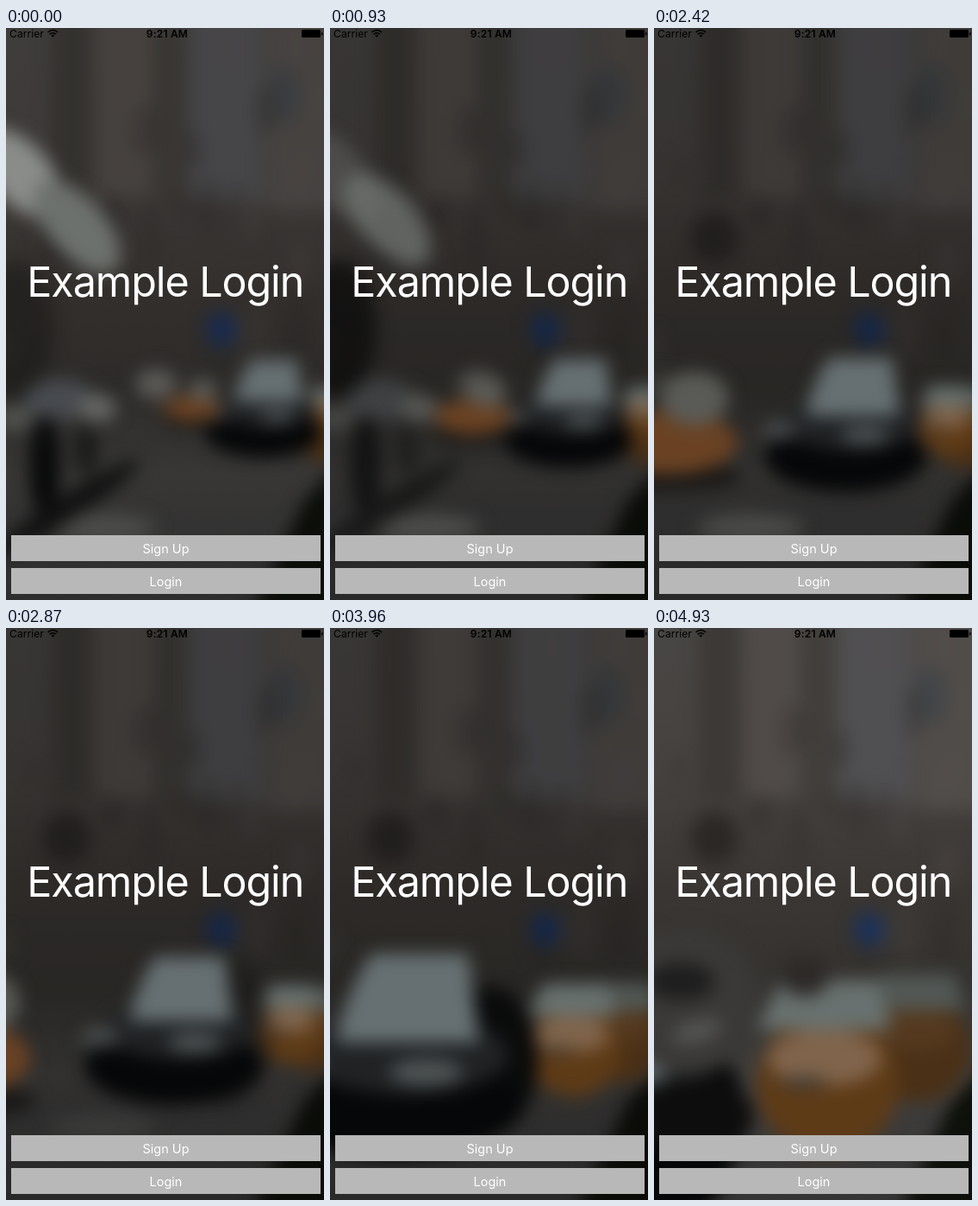
Write an HTML page that moves like this. It is 369 px wide and 662 px high and loops after 5.03 s.

```html
<!DOCTYPE html>
<html lang="en">
<head>
<meta charset="utf-8">
<title>Example Login</title>
<style>
  html, body { margin: 0; width: 100%; height: 100%; overflow: hidden; background: #222; }
  svg { display: block; width: 100vw; height: 100vh; }
  text { font-family: Inter, Roboto, "Liberation Sans", sans-serif; }
</style>
</head>
<body>
<svg viewBox="0 0 369 662" preserveAspectRatio="none">
  <defs>
    <linearGradient id="wallFill" x2="0" y2="1">
      <stop offset="0" stop-color="#484644"/>
      <stop offset=".25" stop-color="#464240"/>
      <stop offset=".46" stop-color="#3a3633"/>
      <stop offset=".63" stop-color="#34322f"/>
      <stop offset=".78" stop-color="#403f3e"/>
      <stop offset="1" stop-color="#363535"/>
    </linearGradient>
    <filter id="soft" filterUnits="userSpaceOnUse" x="-60" y="-60" width="489" height="782" color-interpolation-filters="sRGB">
      <feGaussianBlur stdDeviation="10"/>
    </filter>
  </defs>

  <rect width="369" height="662" fill="url(#wallFill)"/>
  <g id="wall" filter="url(#soft)"></g>
  <rect id="dim" width="369" height="662"/>
  <g id="street" filter="url(#soft)"></g>

  <g id="status">
    <text x="4" y="10.5" font-size="12.2">Carrier</text>
    <g fill="none" stroke="#000" stroke-width="1.5">
      <path d="M48.5 5a8.2 8.2 0 0 1 11.6 0M50.6 7.2a5.2 5.2 0 0 1 7.4 0"/>
      <path d="M54.3 10.8l-1.9-2.1a2.8 2.8 0 0 1 3.8 0z" fill="#000" stroke="none"/>
    </g>
    <text x="187" y="10.5" font-size="12" font-weight="600" letter-spacing=".2" text-anchor="middle">9:21 AM</text>
    <rect x="343" y="2" width="22" height="9" rx="1.5"/>
    <rect x="366" y="5" width="1.5" height="3.5" rx=".7"/>
  </g>

  <text x="184.8" y="311" font-size="48.5" letter-spacing="-1.1" text-anchor="middle" fill="#fff">Example Login</text>

  <g fill="#b8b8b8">
    <rect x="6" y="587" width="359" height="30"/>
    <rect x="6" y="625" width="359" height="30"/>
  </g>
  <g fill="#fff" font-size="14.5" text-anchor="middle">
    <text x="185.5" y="607.5">Sign Up</text>
    <text x="185.5" y="645.5">Login</text>
  </g>
</svg>

<script>
const LOOP = 5030, STEP = 88.7, LEAD = 20;
const $ = id => document.getElementById(id);

function add(parent, tag, attrs) {
  const el = document.createElementNS('http://www.w3.org/2000/svg', tag);
  for (const k in attrs) el.setAttribute(k, attrs[k]);
  return parent.appendChild(el);
}
const blob = (cx, cy, rx, ry, fill, turn = 0) => g =>
  add(g, 'ellipse', { cx, cy, rx, ry, fill, transform: `rotate(${turn} ${cx} ${cy})` });
const box = (x, y, width, height, fill) => g => add(g, 'rect', { x, y, width, height, fill });
const shape = (d, fill) => g => add(g, 'path', { d, fill });

// 0 before a, 1 after b, eased between
function smooth(a, b, t) {
  const u = Math.min(1, Math.max(0, (t - a) / (b - a)));
  return u * u * (3 - 2 * u);
}

function seeded(seed) {
  return () => (seed = seed * 16807 % 2147483647) / 2147483647;
}

// Building front: columns, faint stains, sign and dark kerb
function buildWall() {
  const wall = $('wall'), rnd = seeded(7);
  [
    box(52, -30, 46, 230, '#3c3936'), box(106, -30, 62, 225, '#504b48'),
    box(172, -30, 36, 250, '#413e3b'), box(212, -30, 88, 230, '#504f51'),
    box(304, -30, 90, 240, '#504c49'), blob(322, 78, 18, 34, '#434649')
  ].forEach(draw => draw(wall));
  for (let i = 0; i < 24; i++) {
    const stain = blob(rnd() * 369, rnd() * 400, 6 + rnd() * 12, 14 + rnd() * 26, i % 2 ? '#2a2725' : '#56524f');
    stain(wall).setAttribute('opacity', .3);
  }
  [
    blob(70, 243, 28, 30, '#2b2826'), blob(250, 349, 18, 20, '#1c3159'),
    shape('M400 490L345 548 280 690H400z', '#0e100b')
  ].forEach(draw => draw(wall));
}

// An actor drifts left by a steady part plus a late rush;
// nearing the camera, it grows and sinks in proportion to the drift
const actors = [];
function actor({ x = 0, y = 0, size = 1, pace = 0, rush = 0, grow = 0, sink = 0, fade = () => 1 }, ...parts) {
  const el = add($('street'), 'g', {});
  parts.forEach(draw => draw(el));
  actors.push(t => {
    const drift = pace * t + rush * t ** 4;
    el.setAttribute('transform', `translate(${x - drift} ${y + sink * drift}) scale(${size + grow * drift})`);
    el.setAttribute('opacity', fade(t));
  });
}

const cab = (rx, ry, paint, trim, glass) => [
  blob(0, 4, rx, ry, paint), blob(-2, -12, rx * .8, ry * .4, trim),
  shape(`M${-rx * .65} -60H${rx * .7}L${rx * .9} -29H${-rx}z`, glass)
];

function buildStreet() {
  // Pale patch on the road
  actor({ x: 112, y: 578, fade: t => 1 - smooth(2.3, 3.3, t) },
    blob(0, 0, 62, 16, '#4c4c4a'));

  // Rear, middle and leading cabs, around the pale car
  actor({ x: 372, y: 465, size: .75, pace: 3, rush: .09, grow: .009, sink: .25 },
    ...cab(46, 46, '#4a3016', '#54391f', '#525855'));
  actor({ x: 374, y: 446, size: .5, pace: 10.5, rush: .21, grow: .008, sink: .43 },
    ...cab(44, 43, '#5e3b17', '#80644b', '#68716f'), blob(-15, 3, 15, 4, '#443e38'));
  actor({ x: 280, y: 455, rush: .4, sink: .48, fade: t => smooth(2.3, 3.8, t) },
    blob(0, 0, 56, 86, '#0a0b0b'));
  actor({ x: 305, y: 410, size: .68, pace: 23, rush: .52, grow: .0035, sink: .1 },
    blob(-10, 84, 100, 44, '#060708'), blob(-3, 44, 84, 32, '#202224'),
    blob(-92, 52, 22, 11, '#484c4d'), blob(14, 58, 30, 11, '#4e5354'),
    shape('M-30 -38H48L57 34H-60Q-50 -10 -30 -38z', '#667072'));
  actor({ x: 216, y: 440, size: .58, pace: 54, rush: 2, grow: .0042, sink: .2, fade: t => 1 - smooth(3, 3.8, t) },
    blob(0, 28, 60, 12, '#191817'), blob(0, 0, 56, 26, '#6a4223'), blob(21, -36, 28, 22, '#5a5b57'));

  // Walkers and grey traffic on the left
  actor({ rush: 5, fade: t => Math.max(0, 1 - .3 * t) },
    blob(62, 430, 42, 24, '#484b4f'), blob(106, 440, 22, 16, '#666764'),
    blob(10, 452, 22, 14, '#525350'), blob(174, 412, 24, 17, '#5c5b58'),
    blob(45, 508, 18, 60, '#090a0a'), blob(93, 488, 14, 30, '#1b1b1a'),
    blob(70, 556, 100, 14, '#101110', -33));
  actor({ x: 12, y: 348, rush: 3.2, fade: t => Math.min(1, .3 + .4 * t) },
    blob(0, 0, 44, 80, '#080909'));

  // Bright shoulder and arm
  actor({ x: 16, y: 168, pace: 12, fade: t => 1 - smooth(0, 1.4, t) },
    blob(0, 0, 62, 34, '#8a8c8a', 48));
  actor({ x: 82, y: 230, pace: 13, rush: 6, sink: -.5, fade: t => 1 - smooth(.5, 2.1, t) },
    blob(0, 0, 66, 33, '#6d716d', 48));

  // Mirror, driver and near car at the end
  actor({ x: 222, y: 467, rush: .3, fade: t => smooth(3.9, 4.9, t) },
    blob(-10, -35, 85, 85, '#3a3937'), blob(-18, -58, 40, 22, '#1f1e1e'),
    blob(0, 0, 30, 12, '#565654', -15), blob(0, 98, 66, 44, '#0d0d0d'),
    blob(126, -64, 28, 24, '#2d2a28'));
}

// The scene darkens after the cut and brightens towards the end
const shade = t => .22 - .1 * (1 - smooth(0, .7, t)) - .22 * smooth(3.8, 4.9, t);

function render(ms) {
  const t = ms / 1000;
  actors.forEach(move => move(t));
  $('dim').setAttribute('opacity', shade(t));
}

let start, shown = -1;
function tick(now) {
  start ??= now;
  const step = Math.floor(((now - start) % LOOP - LEAD) / STEP);
  if (step !== shown) render(Math.max(0, LEAD + (shown = step) * STEP));
  requestAnimationFrame(tick);
}
buildWall();
buildStreet();
render(0);
requestAnimationFrame(tick);
</script>
</body>
</html>
```
